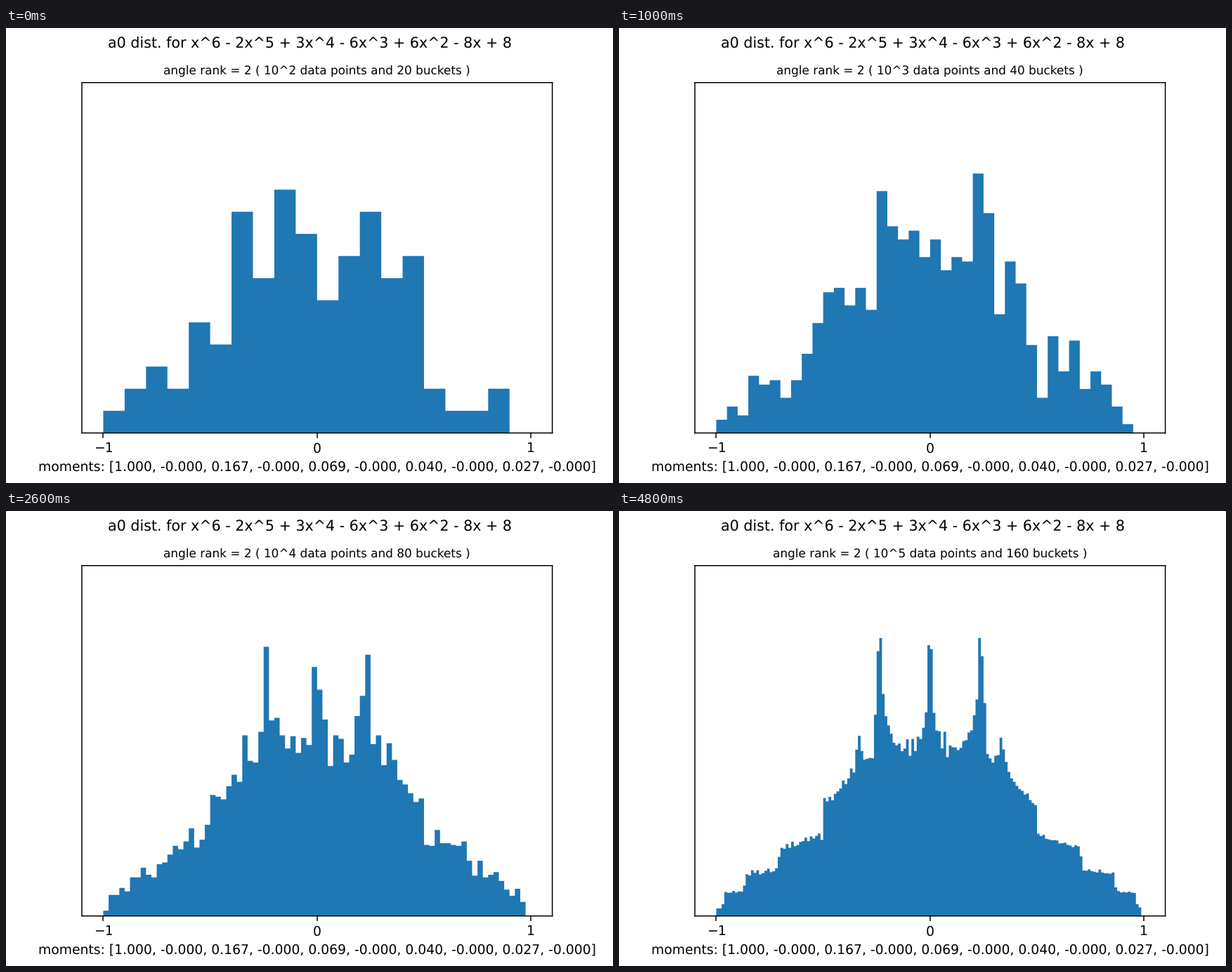
A matplotlib script for the animation above (6000 ms loop, 864 by 648 pixels).

```python
import numpy as np
import matplotlib.pyplot as plt
from matplotlib.animation import FuncAnimation

WEIL_POLYNOMIAL = [1, -2, 3, -6, 6, -8, 8]
EVEN_MOMENTS = [1, 1 / 6, 5 / 72, 0.040, 0.027]
STEP_MS = 1000
LEVELS = 4
HOLD_STEPS = 2  # extra steps on the last level

# Unhinted, unsnapped drawing keeps natural text widths and line positions.
plt.rcParams.update(
    {"font.family": "DejaVu Sans", "text.hinting": "none", "path.snap": False}
)

angles = np.angle(np.roots(WEIL_POLYNOMIAL))
moments = ", ".join(f"{m:.3f}, -0.000" for m in EVEN_MOMENTS)


def normalized_traces(count):
    """Normalized traces of the first count Frobenius powers."""
    powers = np.arange(1, count + 1)
    return np.cos(np.outer(powers, angles)).mean(axis=1)


samples = [normalized_traces(10 ** (level + 2)) for level in range(LEVELS)]

fig, ax = plt.subplots(figsize=(6.4, 4.8), dpi=135)
fig.suptitle("a0 dist. for x^6 - 2x^5 + 3x^4 - 6x^3 + 6x^2 - 8x + 8", fontsize=11)


def update(step):
    level = min(step, LEVELS - 1)
    buckets = 20 * 2**level
    # The edges stop one bucket short of 1.
    edges = np.linspace(-1, 1, buckets, endpoint=False)
    ax.clear()
    ax.hist(
        samples[level], bins=edges, density=True, histtype="stepfilled", color="#1f77b4"
    )
    ax.set(xlim=(-1.1, 1.1), ylim=(0, 1.6), xticks=[-1, 0, 1], yticks=[])
    ax.set_title(
        f"angle rank = 2 ( 10^{level + 2} data points and {buckets} buckets )",
        fontsize=9,
    )
    ax.set_xlabel(f"moments: [{moments}]")


anim = FuncAnimation(
    fig,
    update,
    frames=LEVELS + HOLD_STEPS,
    init_func=lambda: None,
    interval=STEP_MS,
    repeat=True,
    repeat_delay=0,
)
plt.show()
```
